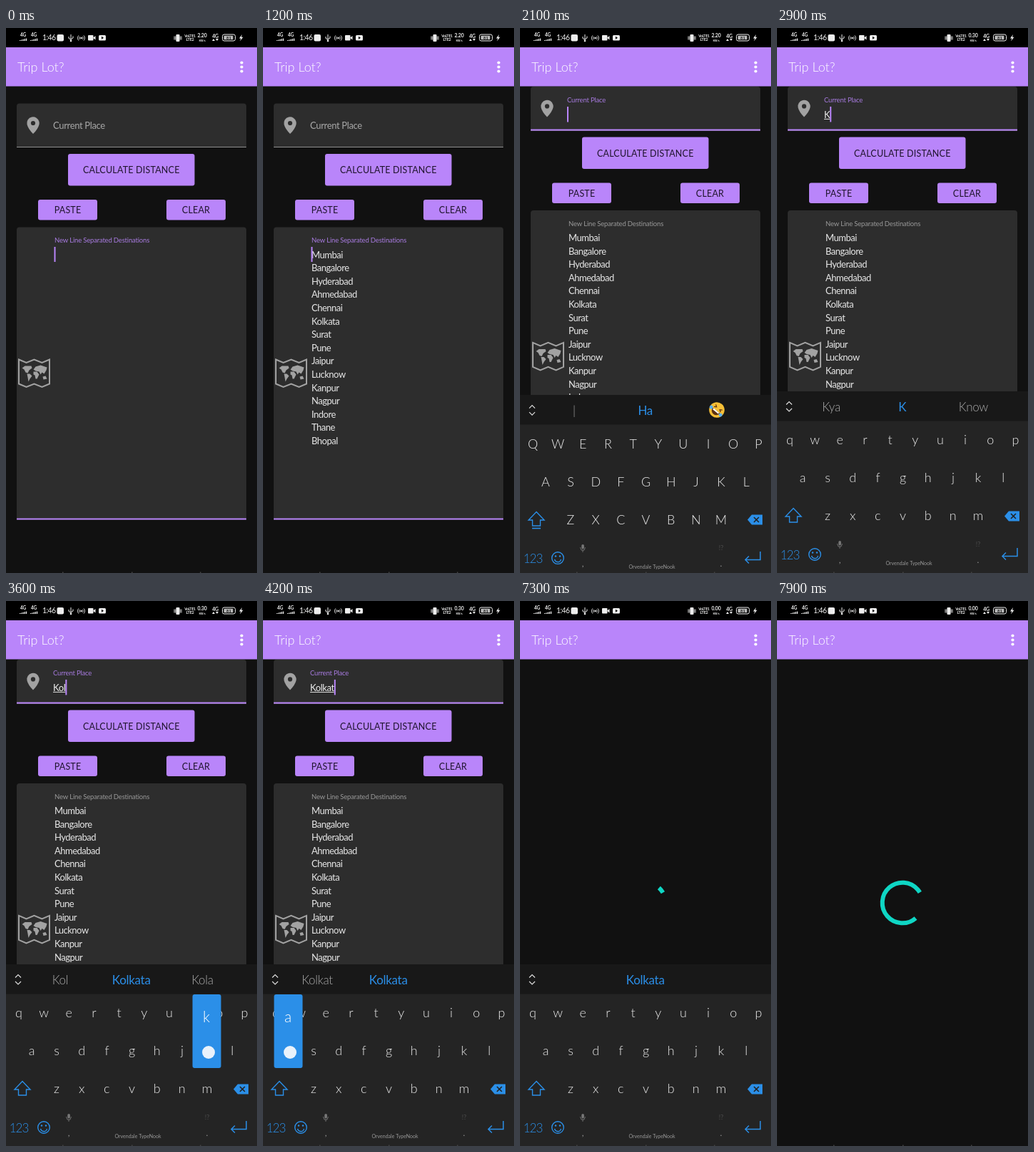
Recreate the animation shown at these times as an HTML page with a canvas. Size 352x762 px, loop 8 s.

```html
<!DOCTYPE html>
<html lang="en">
<head>
<meta charset="utf-8">
<title>Distance app</title>
<style>
html, body { margin: 0; width: 100%; height: 100%; overflow: hidden; background: #111; }
canvas { display: block; width: 352px; height: 762px; }
</style>
</head>
<body>
<canvas id="stage"></canvas>
<script>
const W = 352, H = 762, LOOP = 8000;
const PURPLE = '#b985fa', BLUE = '#2b8fe8', PANEL = '#2d2d2d', BG = '#111', GREY = '#a2a2a2', TEAL = '#0fd6c4';
const FONT = 'Lato, "Open Sans", sans-serif';
const CITIES = 'Mumbai Bangalore Hyderabad Ahmedabad Chennai Kolkata Surat Pune Jaipur Lucknow Kanpur Nagpur Indore Thane Bhopal'.split(' ');
const ROWS = [['qwertyuiop', 18, 576], ['asdfghjkl', 36, 629], ['zxcvbnm', 71, 682]];
const PITCH = 35.15;

// Key presses: letter, down, up
const PRESSES = [
  ['K', 2680, 2840], ['o', 3050, 3160], ['l', 3350, 3460], ['k', 3600, 3720],
  ['a', 3820, 3930], ['t', 4010, 4120], ['a', 4160, 4300]
];
const HINTS = [
  ['|', 'Ha', ''], ['Kya', 'K', 'Know'], ['Ko', 'Kom', 'Koi'], ['Kol', 'Kolkata', 'Kola'],
  ['Kolk', 'Kolkata', ''], ['Kolka', 'Kolkata', ''], ['Kolkat', 'Kolkata', ''], ['', 'Kolkata', '']
];
// Taps: x, y, down, up
const TAPS = [[86, 254, 600, 780], [150, 137, 1690, 1840], [176, 176, 7100, 7260]];
const PASTED = 800, FOCUS = 1850, KEYS_IN = 1900, LOADING = 7300;

const canvas = document.getElementById('stage');
const c = canvas.getContext('2d');
const dpr = window.devicePixelRatio || 1;
canvas.width = W * dpr;
canvas.height = H * dpr;

const clamp = v => Math.max(0, Math.min(1, v));
const span = (t, a, b) => clamp((t - a) / (b - a));
const easeOut = p => 1 - (1 - p) ** 2;
const smooth = p => p * p * (3 - 2 * p);
const mix = (a, b, p) => a + (b - a) * p;
const within = (t, a, b) => t >= a && t < b;

function rect(x, y, w, h, fill, r = 0) {
  c.fillStyle = fill;
  c.beginPath();
  c.roundRect(x, y, w, h, r);
  c.fill();
}

function disc(x, y, r, fill) {
  c.fillStyle = fill;
  c.beginPath();
  c.arc(x, y, r, 0, 7);
  c.fill();
}

function line(points, color, width = 1, close = false) {
  c.beginPath();
  points.forEach(([x, y]) => c.lineTo(x, y));
  if (close) c.closePath();
  c.strokeStyle = color;
  c.lineWidth = width;
  c.stroke();
}

function poly(points, fill) {
  c.beginPath();
  points.forEach(([x, y]) => c.lineTo(x, y));
  c.fillStyle = fill;
  c.fill();
}

// y is the middle of the capitals
function text(str, x, y, size, color, { align = 'left', weight = 400, gap = 0 } = {}) {
  c.font = `${weight} ${size}px ${FONT}`;
  c.letterSpacing = gap + 'px';
  c.textAlign = align;
  c.fillStyle = color;
  c.fillText(str, x, y + size * 0.36);
  return c.measureText(str).width;
}

function statusBar(t) {
  const white = '#eee';
  const tiny = (s, x, y, size = 6.5) => text(s, x, y, size, white, { align: 'center', weight: 700, gap: -0.2 });
  rect(0, 0, W, 27, '#000');
  for (const x of [24, 39]) {
    tiny('4G', x, 10);
    for (let i = 0; i < 5; i++) rect(x - 5 + i * 2.2, 17 - i * 0.6, 1.4, 1 + i * 0.6, white);
  }
  text('1:46', 51, 13.5, 10.5, white, { gap: -0.6 });
  rect(71.5, 9, 9.5, 9.5, white, 2);
  line([[91, 9], [91, 18]], white);
  line([[88, 12], [88, 14.5], [91, 16], [94, 14], [94, 11.5]], white);
  disc(91, 18, 1.3, white);
  disc(105.5, 14, 1.2, white);
  for (const r of [2.7, 5]) for (const a of [0, Math.PI]) {
    c.strokeStyle = white;
    c.lineWidth = 0.9;
    c.beginPath();
    c.arc(105.5, 14, r, a - 0.8, a + 0.8);
    c.stroke();
  }
  rect(115, 10, 7.5, 7.5, white, 1);
  poly([[122, 13.7], [125.5, 11], [125.5, 16.5]], white);
  rect(130, 10, 10, 7.5, white, 1.5);
  poly([[134, 11.7], [137, 13.7], [134, 15.7]], '#000');

  rect(238.5, 9, 5, 10, white, 1);
  for (const d of [-5, -3.2, 3.2, 5]) line([[241 + d, 11.5], [241 + d, 16.5]], white, 0.9);
  tiny('VoLTE1', 258, 11, 5);
  tiny('LTE2', 258, 16.5, 5.5);
  tiny(t < 2700 ? '2.20' : t < 4900 ? '0.30' : '0.00', 275, 10.5, 7);
  tiny('KB/s', 275, 17, 4.5);
  tiny('4G', 293.5, 11, 7);
  poly([[291, 15], [293, 18], [289, 18]], white);
  poly([[294, 15], [298, 15], [296, 18]], white);
  c.beginPath();
  c.roundRect(303.5, 9, 18, 9, 2.5);
  c.strokeStyle = white;
  c.lineWidth = 1;
  c.stroke();
  rect(305.5, 10.8, 13, 5.4, '#bbb', 1);
  text('81', 312.5, 13.6, 6, '#222', { align: 'center', weight: 700 });
  poly([[331, 9], [327, 14.5], [329.5, 14.5], [328, 18.5], [332.5, 12.7], [330, 12.7]], white);
}

function header(t) {
  statusBar(t);
  rect(0, 27, W, 54.5, PURPLE);
  text('Trip Lot?', 16, 55, 18, '#fff', { weight: 300 });
  for (const y of [48.5, 54.5, 60.5]) disc(330.5, y, 2.1, '#fff');
}

function pin(x, y) {
  c.fillStyle = GREY;
  c.beginPath();
  c.arc(x, y - 3, 8.7, Math.PI * 0.93, Math.PI * 0.07);
  c.quadraticCurveTo(x + 7, y + 5, x, y + 12);
  c.quadraticCurveTo(x - 7, y + 5, x - 8.5, y - 1.2);
  c.fill();
  disc(x, y - 3, 3.1, PANEL);
}

function mapIcon(x, y) {
  c.save();
  c.translate(x, y);
  line([[-21.5, -19], [-11, -14.5], [0, -19], [11, -14.5], [21.5, -19],
    [21.5, 15], [11, 19.5], [0, 15], [-11, 19.5], [-21.5, 15]], GREY, 2, true);
  poly([[-17, -7], [-13, -10], [-4, -10], [-3, -7], [-7, -4], [-9, 0], [-12, -1], [-14, -5]], GREY);
  poly([[-10, 1], [-6, 1], [-3, 4], [-6, 8], [-8, 12], [-9, 6]], GREY);
  poly([[-1, -5], [2, -9], [9, -11], [18, -8], [17, -4], [14, 1], [11, -1], [9, 2], [7, -2], [2, -3]], GREY);
  poly([[-1, -2], [4, -2], [7, 2], [4, 8], [2, 8], [1, 3], [-1, 2]], GREY);
  poly([[12, 5], [16, 4], [18, 8], [13, 9]], GREY);
  c.restore();
}

function button(label, x, y, w, h, t, tap) {
  rect(x, y, w, h, PURPLE, 3);
  if (tap) {
    const [tx, , down, up] = tap;
    if (within(t, down, up + 150)) {
      c.save();
      c.beginPath();
      c.roundRect(x, y, w, h, 3);
      c.clip();
      c.globalAlpha = 0.25 * (1 - span(t, up, up + 150));
      disc(tx, y + h / 2, mix(10, w * 0.6, easeOut(span(t, down, up))), '#fff');
      c.restore();
    }
  }
  text(label, x + w / 2, y + h / 2 + 0.5, 12.5, '#20152e', { align: 'center', gap: 0.2 });
}

const typedCount = t => PRESSES.filter(p => t >= p[2]).length;

function caretOn(t) {
  if (t < FOCUS) return t < PASTED ? t < 500 : t < PASTED + 500;
  if (t < 2400) return true;
  if (t < PRESSES[0][2]) return false;
  return t < 4600 || within(t, 5200, 5800);
}

function placeField(t) {
  const focus = smooth(span(t, FOCUS, FOCUS + 150));
  rect(15, 105.5, 322, 61, PANEL, [4, 4, 0, 0]);
  pin(38, 136);
  text('Current Place', 66, mix(136, 124, focus), mix(13, 9.5, focus), focus > 0.5 ? '#a87be0' : '#a8a8a8',
    { gap: mix(-0.35, -0.18, focus) });
  rect(15, 166, 322, 1, '#8f8f8f');
  if (focus > 0) rect(mix(150, 15, focus), 165, 322 * focus, 2, PURPLE);
  if (t < FOCUS) return;
  const typed = PRESSES.slice(0, typedCount(t)).map(p => p[0]).join('');
  const w = typed ? text(typed, 66, 144.5, 13, '#eee', { gap: -0.4 }) : 0;
  if (typed) rect(66, 150.5, w, 1, '#ddd');
  if (caretOn(t)) rect(66 + w, 133.5, 2, 21.5, PURPLE);
}

function destinations(t) {
  const active = t < FOCUS;
  rect(15, 278.5, 322, 409, PANEL, [4, 4, 0, 0]);
  rect(15, 685.5, 322, 2, active ? PURPLE : '#8f8f8f');
  mapIcon(39.5, 482.5);
  text('New Line Separated Destinations', 68, 297, 9.5, active ? '#a87be0' : '#999', { gap: -0.18 });
  if (t >= PASTED) CITIES.forEach((name, i) => text(name, 68, 317 + i * 18.6, 13, '#e8e8e8', { gap: -0.5 }));
  if (active && caretOn(t)) rect(67.5, 306, 2, 21, PURPLE);
}

function form(t) {
  c.save();
  c.translate(0, -23.6 * easeOut(span(t, KEYS_IN, KEYS_IN + 180)));
  placeField(t);
  button('CALCULATE DISTANCE', 87, 176, 177.5, 44.5, t, TAPS[2]);
  button('PASTE', 45, 240, 83, 28.5, t, TAPS[0]);
  button('CLEAR', 225, 240, 83, 28.5, t);
  destinations(t);
  c.restore();
}

function laughFace(x, y) {
  c.save();
  c.translate(x, y);
  c.rotate(0.7);
  disc(0, 0, 10.8, '#f6bf36');
  c.fillStyle = '#5c3112';
  c.beginPath();
  c.arc(0, 1, 6.5, 0, Math.PI);
  c.fill();
  rect(-5, 1, 10, 2, '#fff');
  line([[-6, -5], [-3, -3], [-6, -1]], '#5c3112', 1.3);
  line([[6, -5], [3, -3], [6, -1]], '#5c3112', 1.3);
  disc(-8.5, 2, 2.4, '#58aef0');
  disc(8.5, 2, 2.4, '#58aef0');
  c.restore();
}

function hints(t) {
  const n = typedCount(t);
  const shown = n === 7 && t < 4500 ? 6 : n;
  line([[13, 526.5], [17, 522.5], [21, 526.5]], '#ddd', 1.2);
  line([[13, 532], [17, 536], [21, 532]], '#ddd', 1.2);
  HINTS[shown].forEach((word, i) => text(word, 76 + i * 99.7, 529.5, 17, i === 1 ? BLUE : '#aaa',
    { align: 'center', weight: i === 1 ? 400 : 300, gap: -0.3 }));
  if (!n) laughFace(276, 529);
}

function keyIcons(caps) {
  line([[23, 671.5], [34, 683], [28.5, 683], [28.5, 691], [17.5, 691], [17.5, 683], [12, 683]], BLUE, 1.4, true);
  if (caps) line([[17, 694.5], [29, 694.5]], BLUE, 1.6);
  poly([[319, 682.5], [325, 675.5], [340, 675.5], [340, 689.5], [325, 689.5]], BLUE);
  line([[328, 679], [335, 686]], '#222', 1.6);
  line([[335, 679], [328, 686]], '#222', 1.6);

  text('123', 18, 736.5, 17, BLUE, { align: 'center', weight: 300, gap: -1 });
  c.strokeStyle = BLUE;
  c.lineWidth = 1.4;
  c.beginPath();
  c.arc(53, 736, 8.3, 0, 7);
  c.stroke();
  c.beginPath();
  c.arc(53, 737, 4.6, 0.2, Math.PI - 0.2);
  c.stroke();
  disc(50, 733.5, 1.2, BLUE);
  disc(56, 733.5, 1.2, BLUE);
  line([[337, 727], [337, 738.5], [316, 738.5]], BLUE, 1.5);
  line([[321, 733.5], [316, 738.5], [321, 743.5]], BLUE, 1.5);

  rect(86.3, 717, 3.6, 6.5, '#777', 1.8);
  line([[84.5, 721], [86, 725], [90, 725], [91.5, 721]], '#777', 0.9);
  line([[88, 725], [88, 728]], '#777', 0.9);
  text('!?', 282, 722, 9, '#4d4d4d', { align: 'center' });
  text(',', 88, 744, 12, '#999', { align: 'center' });
  text('.', 282, 744, 12, '#999', { align: 'center' });
  text('Orvendale TypeNook', 185, 748.5, 7, '#999', { align: 'center' });
}

function popup(t) {
  const press = PRESSES.find(p => within(t, p[1], p[2]));
  if (!press) return;
  const key = press[0].toLowerCase();
  const [letters, x0, y] = ROWS.find(r => r[0].includes(key));
  const x = x0 + letters.indexOf(key) * PITCH;
  rect(x - 20.5, y - 79, 40, 103, BLUE, 3);
  text(press[0], x - 1, y - 47.5, 21, '#fff', { align: 'center', weight: 300 });
  disc(x + 2, y + 2, 9, '#e9f2fb');
}

function keyboard(t) {
  const hidden = t < LOADING
    ? (1 - span(t, KEYS_IN, KEYS_IN + 234)) ** 2
    : span(t, LOADING, LOADING + 180) ** 2;
  if (hidden >= 1) return;
  const caps = typedCount(t) === 0;
  c.save();
  c.translate(0, 254 * hidden);
  rect(0, 508, W, 254, '#181818');
  rect(0, 549.5, W, 212.5, '#242424');
  hints(t);
  for (const [letters, x, y] of ROWS) {
    [...letters].forEach((l, i) => text(caps ? l.toUpperCase() : l, x + i * PITCH, y, 18, '#eaeaea',
      { align: 'center', weight: 300 }));
  }
  keyIcons(caps);
  popup(t);
  c.restore();
}

function spinner(t) {
  const sweep = mix(10, 280, smooth(span(t, 7233, 7900)));
  const start = 49 + (t - 7900) * 0.162;
  const rad = Math.PI / 180;
  c.strokeStyle = TEAL;
  c.lineWidth = 6;
  c.beginPath();
  c.arc(176, 422, 28.3, start * rad, (start + sweep) * rad);
  c.stroke();
}

function draw(t) {
  c.setTransform(dpr, 0, 0, dpr, 0, 0);
  rect(0, 0, W, H, BG);
  if (t < LOADING) form(t);
  else spinner(t);
  header(t);
  if (t >= KEYS_IN) keyboard(t);
  for (const [x, y, down, up] of TAPS) {
    if (within(t, down, up)) disc(x, y, 9, 'rgba(255,255,255,.85)');
  }
  for (const x of [79, 176, 272]) rect(x, 760.5, 1.5, 1.5, '#444');
}

function tick() {
  draw(performance.now() % LOOP);
  requestAnimationFrame(tick);
}
tick();
</script>
</body>
</html>
```
